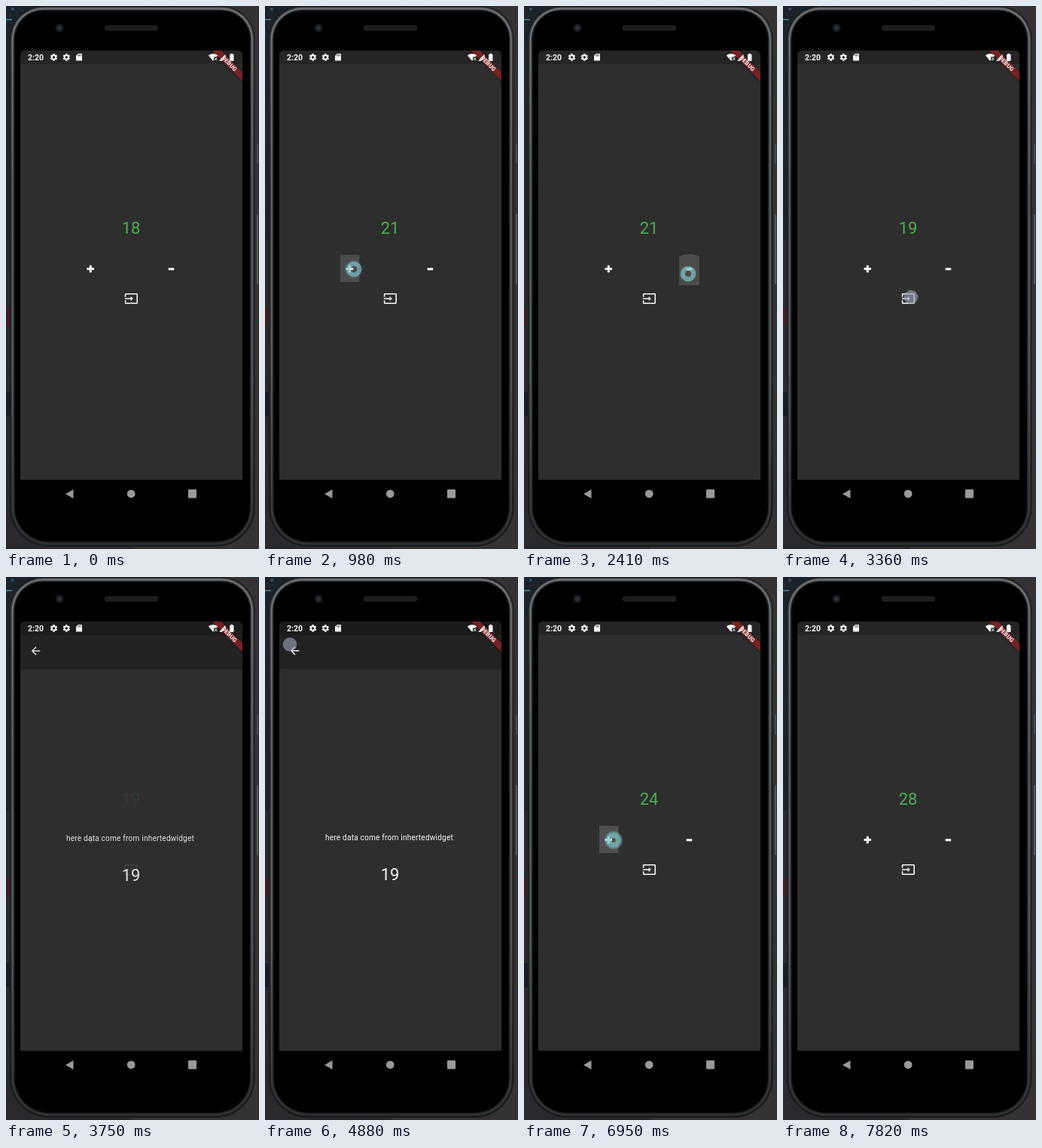
Write an HTML page with a canvas that moves like this. It is 336 px wide and 720 px high and loops after 8 s.

```html
<!DOCTYPE html>
<html lang="en">
<head>
<meta charset="utf-8">
<title>Counter app</title>
<style>
  html, body { margin: 0; width: 100%; height: 100%; overflow: hidden; background: #222; }
  canvas { display: block; }
</style>
</head>
<body>
<canvas id="stage" width="336" height="720"></canvas>
<script>
const ctx = document.getElementById('stage').getContext('2d');
const LOOP = 8000, RING = 300, FADE = 330;
const BG = '#2e2e2e', WHITE = '#f7f7f7', FONT = 'Roboto, sans-serif';
const SCREEN = [19, 59, 295, 569.5];

const INPUT = new Path2D('M21 3.01H3c-1.1 0-2 .9-2 2V9h2V4.99h18v14.03H3V15H1v4.01c0 1.1.9 1.98 2 1.98h18c1.1 0 2-.88 2-1.98v-14c0-1.11-.9-2-2-2zM11 16l4-4-4-4v3H1v2h10v3z');
const BACK = new Path2D('M20 11H7.83l5.59-5.59L12 4l-8 8 8 8 1.41-1.41L7.83 13H20v-2z');

const tap = (down, up, x, y, step = 0) => ({ down, up, x, y, step });
const plusTap = (down, x) => tap(down, down + 70, x, 349, 1);
const minusTap = (down, up) => tap(down, up, 218, 355, -1);

const taps = [
  ...[500, 660, 820, 1320].map(down => plusTap(down, 118)),
  minusTap(2110, 2325), minusTap(2440, 2510), minusTap(2620, 2690),
  tap(3360, 3440, 170, 386),
  tap(4880, 4981, 33, 89.5),
  ...Array.from({ length: 9 }, (_, i) => plusTap(6220 + 150 * i, 119))
];

const clamp = v => Math.max(0, Math.min(1, v));

function bezier(x1, y1, x2, y2) {
  const at = (a, b, s) => 3 * a * s * (1 - s) ** 2 + 3 * b * s * s * (1 - s) + s ** 3;
  return x => {
    let lo = 0, hi = 1;
    for (let i = 0; i < 20; i++) {
      const mid = (lo + hi) / 2;
      if (at(x1, x2, mid) < x) lo = mid; else hi = mid;
    }
    return at(y1, y2, (lo + hi) / 2);
  };
}
const fastOutSlowIn = bezier(0.4, 0, 0.2, 1);
const easeIn = bezier(0.42, 0, 1, 1);

function rect(x, y, w, h, color) {
  ctx.fillStyle = color;
  ctx.fillRect(x, y, w, h);
}

function round(x, y, w, h, r, color) {
  ctx.fillStyle = color;
  ctx.beginPath();
  ctx.roundRect(x, y, w, h, r);
  ctx.fill();
}

function disc(x, y, r, color) {
  ctx.fillStyle = color;
  ctx.beginPath();
  ctx.arc(x, y, r, 0, 7);
  ctx.fill();
}

function poly(color, ...pts) {
  ctx.fillStyle = color;
  ctx.beginPath();
  pts.forEach(([x, y]) => ctx.lineTo(x, y));
  ctx.fill();
}

function vertical(y0, y1, ...colors) {
  const g = ctx.createLinearGradient(0, y0, 0, y1);
  colors.forEach((c, i) => g.addColorStop(i / (colors.length - 1), c));
  return g;
}

function text(str, x, y, size, color, { weight = 400, align = 'center', spacing = 0 } = {}) {
  ctx.font = `${weight} ${size}px ${FONT}`;
  ctx.textAlign = align;
  ctx.letterSpacing = spacing + 'px';
  ctx.fillStyle = color;
  ctx.fillText(str, x, y);
}

function icon(path, cx, cy, scale) {
  ctx.save();
  ctx.translate(cx, cy);
  ctx.scale(scale, scale);
  ctx.translate(-12, -12);
  ctx.fillStyle = WHITE;
  ctx.fill(path);
  ctx.restore();
}

function drawDesk() {
  rect(0, 0, 168, 720, '#2a2a2e');
  rect(168, 0, 168, 720, '#343233');
  rect(0, 0, 50, 50, '#1c232b');
  rect(45, 0, 131, 1, '#22353c');
  rect(0, 17, 8, 2, '#3f6f78');
  rect(0, 50, 5, 260, '#202329');
  rect(0, 400, 4, 24, '#421c20');
  rect(0, 512, 5, 32, '#191b28');
  disc(9, 4, 2, '#34506a');
}

function drawPhone() {
  round(333, 183, 2, 26, 1, '#4c4c4e');
  round(333, 276, 2, 93, 1, '#58595b');

  const body = (d, color) => {
    const top = 44 - d, low = 52 - d;
    round(5 + d, d, 325.5 - 2 * d, 717 - 2 * d, [top, top, low, low], color);
  };
  body(0, '#17191b');
  body(1.2, vertical(0, 717, '#46494b', '#303335', '#303335', '#1b1c1d'));
  body(2.8, vertical(0, 717, '#74787a', '#5f6365', '#5a5e60', '#303234'));
  body(4.8, '#232527');
  body(6.5, '#050505');
  body(8, '#000');

  disc(71, 29, 5.5, '#17191c');
  disc(71, 29, 3, '#2a2f36');
  round(131, 25.5, 71, 7, 3.5, '#262626');
  round(132, 26.5, 69, 5, 2.5, '#1d1d1d');

  poly('#999', [79, 647], [89.5, 641], [89.5, 653]);
  disc(166.2, 646.8, 5.4, '#999');
  round(242, 641, 11, 11.6, 1, '#999');
}

function drawSplash(t, step, [cx, cy], [x, y, w, h]) {
  const live = taps.filter(p => p.step === step && t >= p.down && t < p.up + FADE);
  if (!live.length) return;
  const power = p => t < p.up ? clamp((t - p.down) / 70) : 1 - (t - p.up) / FADE;
  ctx.save();
  ctx.beginPath();
  ctx.rect(x, y, w, h);
  ctx.clip();
  ctx.beginPath();
  for (const p of live) {
    const r = 9 + 20 * clamp((t - p.down) / 150);
    ctx.moveTo(cx + r, cy);
    ctx.arc(cx, cy, r, 0, 2 * Math.PI);
  }
  ctx.fillStyle = `rgba(255,255,255,${0.19 * Math.max(...live.map(power))})`;
  ctx.fill();
  ctx.restore();
}

function drawHome(t) {
  const count = taps.reduce((n, p) => t >= p.up ? n + p.step : n, 18);
  text(String(count), 166, 302, 22, '#4caf50');
  drawSplash(t, 1, [116, 349], [100, 330, 25.5, 36]);
  drawSplash(t, -1, [219.5, 358], [206, 326, 27, 44]);
  rect(107.5, 347, 9.5, 3, WHITE);
  rect(110.8, 343.8, 3, 9.5, WHITE);
  rect(215.7, 347.3, 7.5, 3, WHITE);
  icon(INPUT, 166.4, 388, 0.78);
}

function drawPage(t) {
  const v = t < 4400 ? clamp((t - 3470) / 300) : 1 - clamp((t - 4980) / 270);
  if (v <= 0) return;
  const [x, y, w, h] = SCREEN;
  ctx.save();
  ctx.globalAlpha = easeIn(v);
  ctx.translate(0, 142 * (1 - fastOutSlowIn(v)));
  rect(x, y, w, h, BG);
  rect(x, 119, w, 5, vertical(119, 124, '#0006', '#0000'));
  rect(x, y, w, 60.5, '#222');
  icon(BACK, 39.5, 97.7, 0.718);
  text('here data come from inhertedwidget', 165, 349.3, 10.1, WHITE, { spacing: 0.2 });
  text('19', 166, 402.3, 22, WHITE);
  ctx.restore();
}

function drawBanner() {
  ctx.save();
  ctx.translate(314, 59);
  ctx.rotate(Math.PI / 4);
  ctx.shadowColor = '#0008';
  ctx.shadowBlur = 4;
  rect(-40, 20.1, 80, 8.6, '#752325');
  ctx.shadowBlur = 0;
  text('DEBUG', 0, 27.2, 7.7, '#f0e8e8', { weight: 900, spacing: 0.1 });
  ctx.restore();
}

function drawGear(x, y) {
  ctx.save();
  ctx.translate(x, y);
  for (let i = 0; i < 3; i++) {
    rect(-1.4, -4.7, 2.8, 9.4, WHITE);
    ctx.rotate(Math.PI / 3);
  }
  disc(0, 0, 3.5, WHITE);
  disc(0, 0, 1.7, '#252525');
  ctx.restore();
}

function drawStatus() {
  text('2:20', 29, 72, 10.5, WHITE, { weight: 700, align: 'left' });
  drawGear(63.5, 68);
  drawGear(80.3, 68);
  poly(WHITE, [93, 66], [95.7, 63.3], [101, 63.3], [101, 72.5], [93, 72.5]);
  for (let i = 0; i < 3; i++) rect(95.4 + 1.7 * i, 64.5, 0.9, 2, '#252525');

  ctx.fillStyle = WHITE;
  ctx.beginPath();
  ctx.moveTo(275, 72.8);
  ctx.lineTo(268.8, 65.6);
  ctx.quadraticCurveTo(275, 61, 281.2, 65.6);
  ctx.fill();
  rect(276, 67.5, 5.5, 5.5, '#252525');
  ctx.strokeStyle = WHITE;
  ctx.lineWidth = 1;
  ctx.beginPath();
  ctx.moveTo(277, 68.5); ctx.lineTo(280.3, 72);
  ctx.moveTo(280.3, 68.5); ctx.lineTo(277, 72);
  ctx.stroke();
  poly(WHITE, [283, 72.8], [291.5, 64], [291.5, 67], [287, 72.8]);
  round(297, 64, 5.5, 9, 0.8, WHITE);
  rect(298.5, 63, 2.5, 1.5, WHITE);
}

function drawPointer(t) {
  for (const p of taps) {
    if (t < p.down || t >= p.up + RING) continue;
    if (t < p.up) {
      disc(p.x, p.y, 9.3, 'rgba(155,158,181,.64)');
      continue;
    }
    const k = (t - p.up) / RING;
    const outer = 9.3 + 3.7 * k, inner = Math.min(outer - 0.5, 14 * k);
    ctx.strokeStyle = `rgba(126,196,202,${0.76 * (1 - k * k)})`;
    ctx.lineWidth = outer - inner;
    ctx.beginPath();
    ctx.arc(p.x, p.y, (outer + inner) / 2, 0, 7);
    ctx.stroke();
  }
}

function draw(t) {
  drawDesk();
  drawPhone();
  ctx.save();
  ctx.beginPath();
  ctx.roundRect(...SCREEN, [6, 6, 0, 0]);
  ctx.clip();
  rect(...SCREEN, BG);
  drawHome(t);
  drawPage(t);
  rect(19, 59, 295, 18, 'rgba(0,0,0,.2)');
  drawBanner();
  drawStatus();
  drawPointer(t);
  ctx.restore();
}

const start = performance.now();
function frame() {
  draw((performance.now() - start) % LOOP);
  requestAnimationFrame(frame);
}
frame();
</script>
</body>
</html>
```
